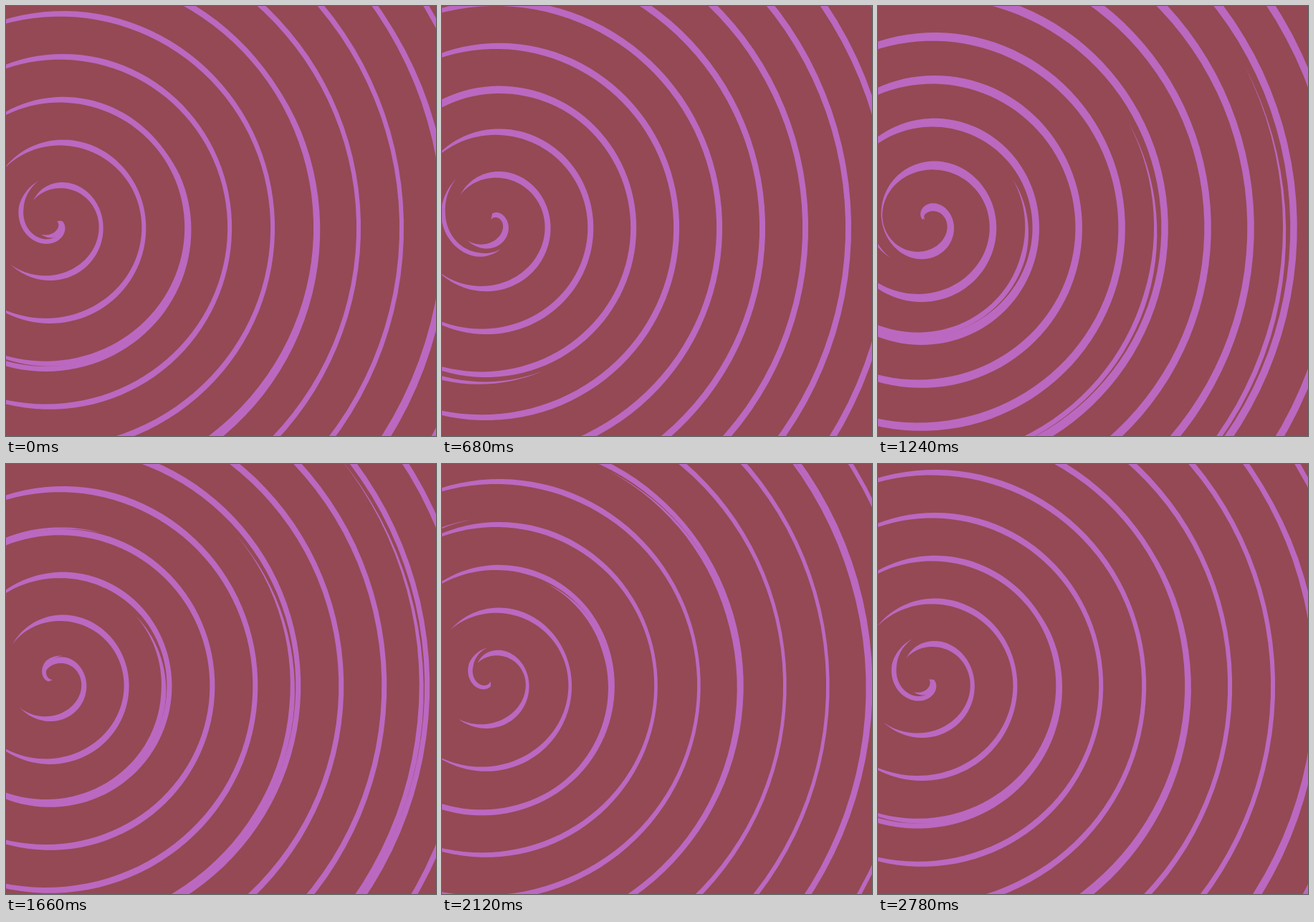
Write an HTML page with a canvas that moves like this. It is 600x600 px and loops after 2.8 s.

```html
<!DOCTYPE html>
<html lang="en">
<head>
<meta charset="utf-8">
<title>Spiral</title>
<style>
  html, body { margin: 0; width: 100%; height: 100%; overflow: hidden; background: #954954; }
  canvas { display: block; width: 100vmin; height: 100vmin; }
</style>
</head>
<body>
<canvas id="stage" width="600" height="600"></canvas>
<script>
const ctx = document.getElementById('stage').getContext('2d');
const LOOP = 2800, STEPS = 60, PITCH = 60;
const CX = 68, CY = 300, INNER = 6;

// step, width at right / top and bottom / left, shift of the centre line
const MAIN = [
  [0, 6, 7.5, -5, 0], [14, 8, 8, -4, 1], [26, 9.5, 11.5, 1.5, 2],
  [35, 7, 8, -4, 0.7], [41, 3.5, 7, -6, 0], [52, 6, 6.5, -8, 0.7], [60, 6, 7.5, -5, 0]
];
// age, first turn, last turn, greatest width
const STRAND = [
  [10, 1.6, 1.95, 6], [26, 0.928, 1.88, 7], [35, 0.894, 1.8, 7], [41, 0.858, 1.744, 7],
  [52, 0.803, 1.715, 7], [60, 0.82, 1.69, 7], [74, 1.197, 1.64, 6], [86, 1.375, 1.6, 4], [98, 1.5, 1.5, 0]
];

function interpolate(keys, at) {
  let i = 0;
  while (i < keys.length - 2 && keys[i + 1][0] < at) i++;
  const a = keys[i], b = keys[i + 1], k = (at - a[0]) / (b[0] - a[0]);
  return a.slice(1).map((v, j) => v + (b[j + 1] - v) * k);
}

// Fills a ribbon along the spiral; shape(turn) gives [radius, width].
function ribbon(from, to, shape) {
  const count = Math.max(8, Math.ceil((to - from) * 120));
  const outer = [], inner = [];
  for (let i = 0; i <= count; i++) {
    const turn = from + (to - from) * i / count;
    const [radius, width] = shape(turn);
    if (radius < INNER) continue;
    const angle = turn * 2 * Math.PI, half = Math.max(0, width) / 2;
    const point = r => [CX + r * Math.cos(angle), CY + r * Math.sin(angle)];
    outer.push(point(radius + half));
    inner.push(point(Math.max(0, radius - half)));
  }
  ctx.beginPath();
  for (const [x, y] of outer.concat(inner.reverse())) ctx.lineTo(x, y);
  ctx.fill();
}

function draw(step) {
  ctx.fillStyle = '#954954';
  ctx.fillRect(0, 0, 600, 600);
  ctx.fillStyle = '#bb68c1';
  const base = turn => PITCH * turn + 64 + step;

  const [right, upright, left, shift] = interpolate(MAIN, step);
  const mean = (right + left) / 4 + upright / 2;
  const side = (right - left) / 2;
  const oval = (right + left) / 4 - upright / 2;
  // One ribbon per turn keeps overlaps of the fill simple.
  for (let turn = -3; turn < 10; turn++) {
    ribbon(turn, turn + 1, s => {
      const a = s * 2 * Math.PI;
      return [base(s) + shift, mean + side * Math.cos(a) + oval * Math.cos(2 * a)];
    });
  }

  // Steeper strands cross the main spiral on every third turn.
  for (let cycle = 0; cycle < 2; cycle++) {
    const age = step + STEPS * cycle;
    if (age < 10 || age > 98) continue;
    const [first, last, widest] = interpolate(STRAND, age);
    for (let m = -2; m < 4; m++) {
      const offset = cycle + 3 * m;
      ribbon(first + offset, last + offset, s => {
        const local = s - offset;
        const drift = 18 * (local - 1) + 0.4 * (age - 26) - 11;
        const taper = 55 * Math.min(local - first, last - local);
        return [base(s) + drift, Math.min(widest, taper)];
      });
    }
  }
}

// Steps come in threes: two of 20 ms, then one of 100 ms.
function stepAt(time) {
  const t = time % LOOP + 20, part = t % 140;
  const n = 3 * Math.floor(t / 140) + (part < 20 ? 0 : part < 40 ? 1 : 2) - 1;
  return (n + STEPS) % STEPS;
}

const start = performance.now();
function tick() {
  draw(stepAt(performance.now() - start));
  requestAnimationFrame(tick);
}
tick();
</script>
</body>
</html>
```
